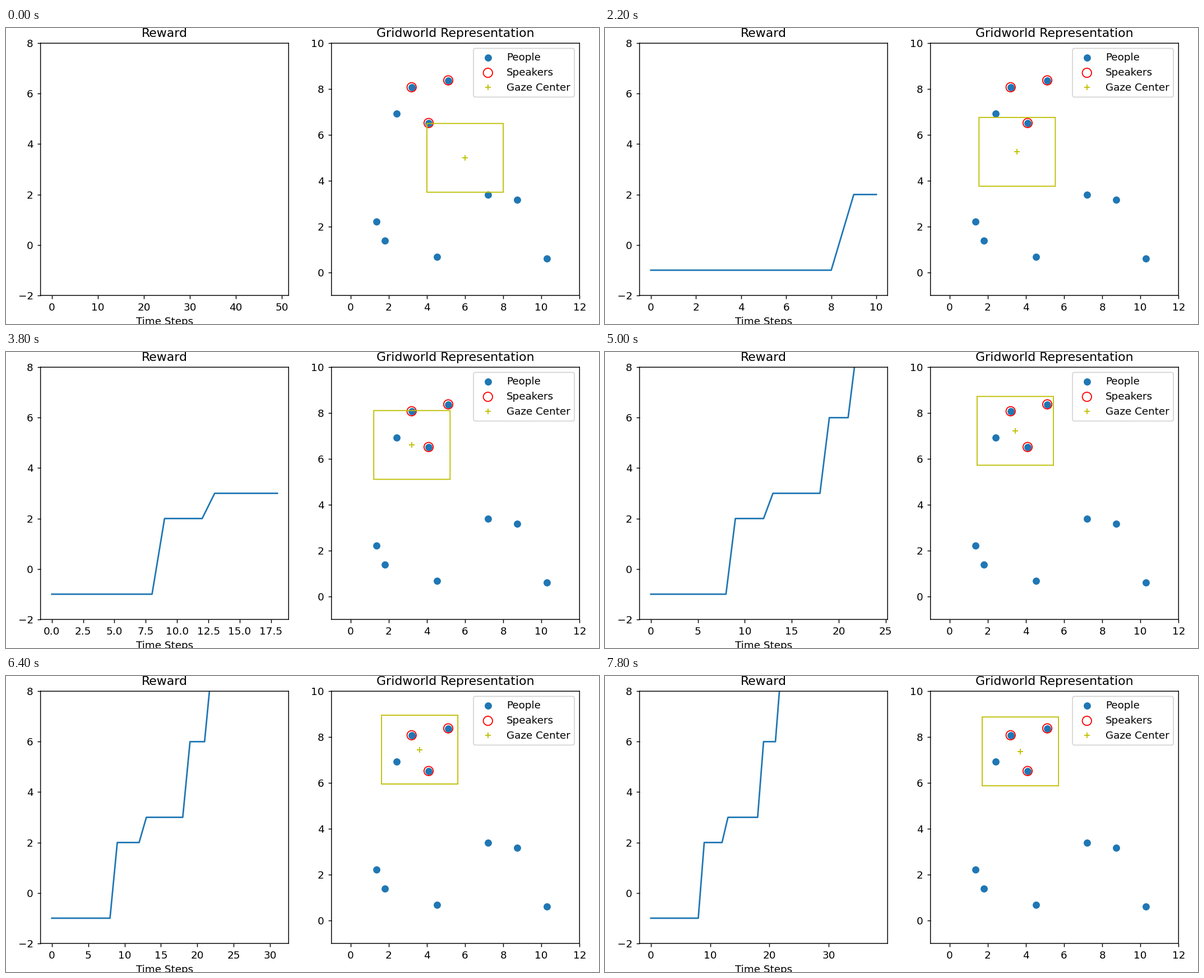
Recreate the animation shown at these times as a matplotlib script. Size 1058x529 px, loop 8000 ms.

```python
import matplotlib.pyplot as plt
import numpy as np
from matplotlib.animation import FuncAnimation
from matplotlib.patches import Rectangle

W, H, DPI = 1058, 529, 132.25
STEPS, INTERVAL = 40, 200
VIEW = np.array([4, 3])

plt.rcParams["path.snap"] = False

# The three speakers come first
people = np.array([
    (3.2, 8.08), (5.12, 8.38), (4.09, 6.52), (2.41, 6.93), (7.21, 3.4),
    (8.72, 3.17), (1.36, 2.22), (1.8, 1.38), (4.52, 0.69), (10.28, 0.61),
])

# The reward rises by three at each of three steps, and once by one
steps = np.arange(STEPS)
reward = sum(3 * (steps >= s) for s in (9, 19, 22)) + (steps >= 13) - 1

# Key points of the gaze, joined by smooth cubic pieces
key_times = np.array([0, 7, 13, 19, 27, 39])
keys = np.array([(6, 5), (4.3, 4.95), (3.29, 5.51),
                 (3.215, 6.61), (3.52, 7.35), (3.71, 7.375)])
slopes = np.gradient(keys, key_times, axis=0)


def gaze_at(t):
    k = np.searchsorted(key_times[1:-1], t, side="right")
    h = key_times[k + 1] - key_times[k]
    u = (t - key_times[k]) / h
    ease = u * u * (3 - 2 * u)
    bend = u * (1 - u) * ((1 - u) * slopes[k] - u * slopes[k + 1])
    return keys[k] + ease * (keys[k + 1] - keys[k]) + h * bend


def add_axes(left, title):
    top, bottom, width = 27.2, 477.9, 442.6
    ax = fig.add_axes([left / W, 1 - bottom / H, width / W, (bottom - top) / H])
    ax.set_title(title)
    return ax


fig = plt.figure(figsize=(W / DPI, H / DPI), dpi=DPI)

reward_ax = add_axes(61.6, "Reward")
reward_ax.set_xlabel("Time Steps")
reward_ax.set_ylim(-2, 8)
curve, = reward_ax.plot([], [])

grid_ax = add_axes(580.7, "Gridworld Representation")
grid_ax.set_xlim(-1, 12)
grid_ax.set_ylim(-1, 10)
grid_ax.scatter(*people.T, s=36, color="C0", label="People")
grid_ax.scatter(*people[:3].T, s=80, facecolors="none", edgecolors="r",
                label="Speakers")
center, = grid_ax.plot([], [], "y+", markersize=5.6, label="Gaze Center")
view = grid_ax.add_patch(Rectangle((0, 0), *VIEW, fill=False, edgecolor="y"))
grid_ax.legend(loc="upper right")


def fit_x(last):
    lo, hi = (0, last) if last else (-0.05, 0.05)
    margin = 0.05 * (hi - lo)
    reward_ax.set_xlim(lo - margin, hi + margin)


def update(i):
    curve.set_data(steps[:i], reward[:i])
    fit_x(i - 1 if i else 49)
    gaze = gaze_at(i)
    center.set_data(gaze[:1], gaze[1:])
    view.set_xy(gaze - VIEW / 2)
    return curve, center, view


anim = FuncAnimation(fig, update, frames=STEPS, interval=INTERVAL,
                     init_func=lambda: update(0), repeat=True, repeat_delay=0)
plt.show()
```
